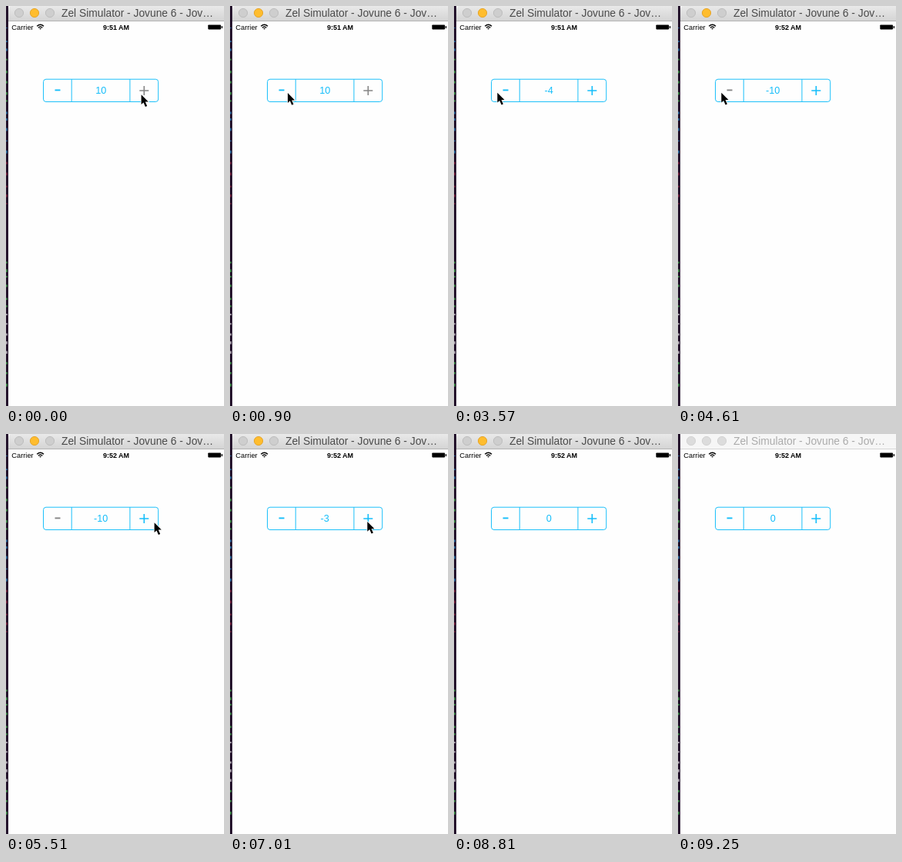
These frames come from a looping animation (283x520 px, 9.27 s). An HTML page:

```html
<!DOCTYPE html>
<html lang="en">
<head>
<meta charset="utf-8">
<title>Stepper</title>
<style>
  html, body { margin: 0; width: 100%; height: 100%; overflow: hidden; background: #fefefe; }
  svg { display: block; width: 283px; height: 520px; font-family: "Liberation Sans", Arial, sans-serif; }
</style>
</head>
<body>
<svg viewBox="0 0 283 520">
  <defs>
    <linearGradient id="bar" x2="0" y2="1">
      <stop offset="0" stop-color="#e9e9e9"/>
      <stop offset="1" stop-color="#d3d3d3"/>
    </linearGradient>
  </defs>
  <rect width="283" height="520" fill="#fefefe"/>
  <rect width="3" height="520" fill="#25152d"/>
  <g id="strip"></g>

  <path id="chrome" d="M3 20V5Q3 0 8 0H283V20Z"/>
  <rect id="edge" x="3" y="19" width="280" height="1"/>
  <g id="lights">
    <circle cx="17" cy="9" r="5.6"/>
    <circle cx="37" cy="9" r="5.6"/>
    <circle cx="57" cy="9" r="5.6"/>
  </g>
  <text id="title" x="72" y="14" font-size="13.8">Zel Simulator - Jovune 6 - Jov…</text>

  <text x="7.3" y="30.5" font-size="9.3">Carrier</text>
  <g fill="none" stroke="#000" stroke-width="1.4">
    <path d="M40.2 26.3Q44.6 22 49 26.3M41.9 28.2Q44.6 25.6 47.3 28.2"/>
    <path d="M44.6 30.6L43.2 29.3Q44.6 28.2 46 29.3Z" fill="#000" stroke="none"/>
  </g>
  <text id="clock" x="143" y="30.5" font-size="9" font-weight="bold" text-anchor="middle"></text>
  <rect x="262.3" y="24.4" width="16.7" height="6" rx=".8"/>
  <rect x="279.7" y="26" width="1.3" height="3"/>

  <g fill="none" stroke="#1cc0fa">
    <rect x="48.5" y="95.2" width="149.2" height="29.3" rx="3.5"/>
    <path d="M85.2 95V124.5M160.9 95V124.5"/>
  </g>
  <path id="minus" d="M63.5 109.4H70.5" stroke-width="1.9"/>
  <path id="plus" d="M173.3 110H185.3M179.3 104V116" stroke-width="1.6"/>
  <text id="value" x="123.2" y="114" font-size="12.6" text-anchor="middle" fill="#14bdfa"></text>

  <path id="cursor" d="M1.6 1.2V14L4.5 11.4L6.9 16.9L9.2 15.9L6.8 10.6H10.8Z"
        stroke="#fff" stroke-width="1.6" paint-order="stroke"/>
</svg>
<script>
const LOOP = 9270, STEP = 148.7, BLUE = "#14bdfa", GRAY = "#858585";
const $ = id => document.getElementById(id);
const paint = (node, attrs) => {
  for (const k in attrs) node.setAttribute(k, attrs[k]);
};

// Scraps of the terminal behind the window: one colour per 65px band
const bands = ["#2b7fb8", "#3fa84a", "#2b7fb8", "#8a2742", "none", "#3fa84a", "#cfcad2", "#3fa84a"];
let seed = 7;
const random = () => (seed = seed * 16807 % 2147483647) / 2147483647;
for (let y = 28; y < 500; y += 8 + 10 * random())
  $("strip").innerHTML += `<rect y="${y}" width="2" height="${1 + 3 * random()}" fill="${bands[Math.floor(y / 65)]}" opacity=".7"/>`;

// A held button repeats on six steps out of seven
const repeats = (n, phase) => n > 0 ? n - Math.floor((n + phase) / 7) : 0;

function valueAt(step) {
  const down = (step >= 8) + repeats(step - 9, 2);
  const up = repeats(step - 39, 0);
  return 10 - Math.min(20, down) + Math.min(10, up);
}

// Pointer stops: step, x, y
const stops = [
  [3, 174, 114], [7, 54.7, 111.5], [33, 54.7, 111.5], [35, 110, 119.5], [37, 191, 114],
  [38, 176.7, 112.7], [56, 176.7, 112.7], [58, 225, 447], [59, 300, 560]
];

function pointerAt(step) {
  const i = stops.findIndex(s => s[0] >= step);
  if (i < 1) return stops.at(i).slice(1);
  const [a, b] = [stops[i - 1], stops[i]];
  const p = (step - a[0]) / (b[0] - a[0]);
  const ease = p * p * (3 - 2 * p);
  return [1, 2].map(k => a[k] + (b[k] - a[k]) * ease);
}

function draw(t) {
  const step = Math.floor(t / STEP);
  const value = valueAt(step);
  const active = t < 9250;

  $("value").textContent = value;
  $("clock").textContent = step < 28 ? "9:51 AM" : "9:52 AM";
  paint($("minus"), { stroke: value > -10 ? BLUE : GRAY });
  paint($("plus"), { stroke: value < 10 ? BLUE : GRAY });
  paint($("cursor"), { transform: `translate(${pointerAt(step)})` });

  paint($("chrome"), { fill: active ? "url(#bar)" : "#f6f6f6" });
  paint($("edge"), { fill: active ? "#b4b4b4" : "#d6d6d6" });
  paint($("title"), { fill: active ? "#4a4a4a" : "#ababab" });
  [...$("lights").children].forEach((dot, i) => paint(dot,
    !active ? { fill: "#dcdcdc", stroke: "#d2d2d2" } :
    i === 1 ? { fill: "#ffbd2e", stroke: "#e5a52b" } :
    { fill: "#cecece", stroke: "#bdbdbd" }));
}

const start = performance.now();
function tick() {
  draw((performance.now() - start) % LOOP);
  requestAnimationFrame(tick);
}
tick();
</script>
</body>
</html>
```
